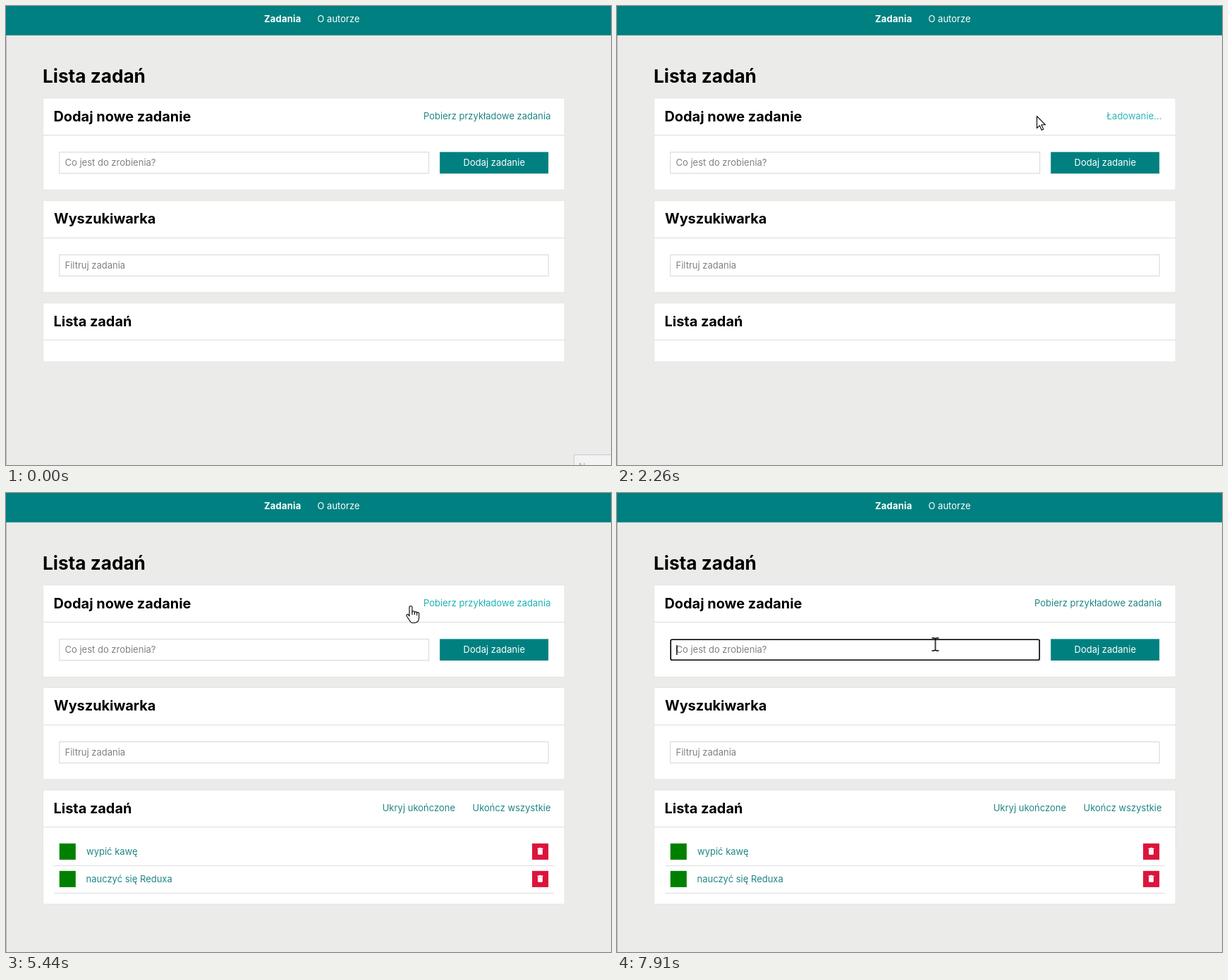
These frames come from a looping animation (858x652 px, 8000 ms). An HTML page:

```html
<!DOCTYPE html>
<html lang="pl">
<head>
<meta charset="utf-8">
<title>Lista zadań</title>
<style>
  html, body { margin: 0; width: 100%; height: 100%; overflow: hidden; background: #ebebea; }
  svg { display: block; width: 858px; height: 652px; font: 13px Inter, sans-serif; }
  line { shape-rendering: crispEdges; }

  .h1 { font-size: 26.2px; font-weight: 700; }
  .h2 { font-size: 19.9px; font-weight: 700; }
  .bold { font-weight: 700; letter-spacing: .2px; }
  .end { text-anchor: end; }
  .mid { text-anchor: middle; }
  .teal { fill: #008080; }
  .action { fill: #1f8585; }
  .white { fill: #fff; }
  .hint { fill: #808080; }
  .card { fill: #fff; stroke: #e1e1e1; stroke-width: .8; }
  .rule { stroke: #ddd; }
  .field { fill: #fff; stroke: #d6d6d6; }
  .shape { fill: #fff; stroke: #000; stroke-width: 1.1; stroke-linejoin: round; }

  .anim { animation: 8s linear infinite; }
  .switch { animation: 8s step-end infinite; }

  /* percent = milliseconds / 80 */
  .popup { animation-name: popup; }
  @keyframes popup { 0% { opacity: 1 } .875%, 100% { opacity: 0 } }

  .link { animation-name: link; }
  @keyframes link {
    0%, 22.125% { fill: #1f8585 }
    27.5% { fill: #1ab3b3 }
    34.375%, 56.875% { fill: #ccc }
    63%, 68.75% { fill: #1ab3b3 }
    75%, 100% { fill: #1f8585 }
  }
  .fetch { animation-name: fetch; }
  @keyframes fetch { 0% { opacity: 1 } 28.125% { opacity: 0 } 56.875%, 100% { opacity: 1 } }
  .loading { animation-name: loading; }
  @keyframes loading { 0% { opacity: 0 } 28.125% { opacity: 1 } 56.875%, 100% { opacity: 0 } }

  .tasks { animation-name: tasks; }
  @keyframes tasks { 0% { opacity: 0 } 56.875%, 100% { opacity: 1 } }

  .focus { animation-name: focus; }
  @keyframes focus { 0% { opacity: 0 } 84.875%, 100% { opacity: 1 } }
  .caret { animation-name: caret; }
  @keyframes caret {
    0% { opacity: 0 } 84.875% { opacity: 1 } 92.25% { opacity: 0 } 98.875%, 100% { opacity: 1 }
  }

  .cursor { animation-name: move; }
  @keyframes move {
    0%, 7.375% { transform: translate(752px, 638px); animation-timing-function: steps(6) }
    12.625% { transform: translate(575px, 340px); animation-timing-function: steps(4) }
    15.25% { transform: translate(509px, 205px); animation-timing-function: steps(2) }
    16.875% { transform: translate(545px, 180px); animation-timing-function: steps(3) }
    19.5% { transform: translate(578px, 164px); animation-timing-function: steps(4) }
    23% { transform: translate(592px, 152px); animation-timing-function: step-end }
    24.75% { transform: translate(594px, 147px); animation-timing-function: steps(2) }
    25.75% { transform: translate(596px, 142px); animation-timing-function: steps(2) }
    27.375% { transform: translate(595px, 158px); animation-timing-function: step-end }
    28.25% { transform: translate(595px, 156px); animation-timing-function: steps(7) }
    34.375% { transform: translate(584px, 158px); animation-timing-function: step-end }
    38.5% { transform: translate(582px, 158px); animation-timing-function: step-end }
    39.375% { transform: translate(581px, 158px); animation-timing-function: step-end }
    40.125%, 67.125% { transform: translate(580px, 158px); animation-timing-function: step-end }
    68% { transform: translate(574px, 160px); animation-timing-function: steps(4) }
    71.5% { transform: translate(508px, 178px); animation-timing-function: steps(5) }
    76.375% { transform: translate(451.5px, 214px); animation-timing-function: step-end }
    81.625%, 100% { transform: translate(451.5px, 215px) }
  }
  .arrow { animation-name: arrow; }
  @keyframes arrow {
    0% { opacity: 0 } 7.375% { opacity: 1 } 22.125% { opacity: 0 }
    28.125% { opacity: 1 } 56.875% { opacity: 0 } 68.875% { opacity: 1 }
    75.25%, 100% { opacity: 0 }
  }
  .hand { animation-name: hand; }
  @keyframes hand {
    0% { opacity: 0 } 22.125% { opacity: 1 } 28.125% { opacity: 0 }
    56.875% { opacity: 1 } 68.875%, 100% { opacity: 0 }
  }
  .beam { animation-name: beam; }
  @keyframes beam { 0% { opacity: 0 } 75.25%, 100% { opacity: 1 } }
</style>
</head>
<body>
<svg viewBox="0 0 858 652">
  <defs>
    <g id="task">
      <rect x="75.700" y="497.800" width="23.100" height="23.100" fill="#008000"/>
      <rect x="746.100" y="497.800" width="23.100" height="23.100" fill="#dc143c"/>
      <path class="white" d="M753.7 504.500h2.300l.6-.8h2l.6.8h2.300v1.400h-7.800z M754.200 506.300h6.800v6.200q0 1.300-1.200 1.300h-4.400q-1.200 0-1.200-1.300z"/>
      <line class="rule" x1="68" x2="777" y1="529.5" y2="529.5"/>
    </g>
  </defs>

  <rect width="858" height="652" fill="#ebebea"/>
  <line x1=".5" x2=".5" y1="41" y2="652" stroke="#b8b8b8"/>
  <rect class="teal" width="858" height="41.700"/>
  <text class="white bold" x="366" y="23">Zadania</text>
  <text class="white" x="441.500" y="23">O autorze</text>
  <text class="h1" x="52" y="109">Lista zadań</text>

  <rect class="card" x="52.600" y="130.800" width="739.600" height="130.500"/>
  <line class="rule" x1="53" x2="792" y1="183.5" y2="183.5"/>
  <text class="h2" x="67.500" y="163.500">Dodaj nowe zadanie</text>
  <g class="link anim">
    <text class="fetch switch end" x="772.500" y="161">Pobierz przykładowe zadania</text>
    <text class="loading switch end" x="772.500" y="161">Ładowanie...</text>
  </g>
  <rect class="field" x="75.700" y="207.600" width="524" height="30"/>
  <text class="hint" x="83.500" y="227">Co jest do zrobienia?</text>
  <rect class="focus switch" x="76.200" y="208.200" width="522.900" height="29" rx="2" fill="none" stroke="#000" stroke-width="1.600"/>
  <rect class="caret switch" x="84.200" y="216" width="1.400" height="14"/>
  <rect class="teal" x="615.200" y="207.400" width="154" height="30.600"/>
  <text class="white mid" x="692.300" y="227">Dodaj zadanie</text>

  <rect class="card" x="52.600" y="276.600" width="739.600" height="130.200"/>
  <line class="rule" x1="53" x2="792" y1="329.5" y2="329.5"/>
  <text class="h2" x="68" y="309">Wyszukiwarka</text>
  <rect class="field" x="75.700" y="353.500" width="693.500" height="30"/>
  <text class="hint" x="83.500" y="372.500">Filtruj zadania</text>

  <rect class="card" x="52.600" y="422" width="739.600" height="83.500"/>
  <g class="tasks switch">
    <rect class="card" x="52.600" y="422" width="739.600" height="162"/>
    <g class="action">
      <text class="end" x="637" y="452">Ukryj ukończone</text>
      <text class="end" x="772.500" y="452">Ukończ wszystkie</text>
      <text x="114" y="513.500">wypić kawę</text>
      <text x="113.500" y="552.500">nauczyć się Reduxa</text>
    </g>
    <use href="#task"/>
    <use href="#task" y="39"/>
  </g>
  <line class="rule" x1="53" x2="792" y1="474.5" y2="474.5"/>
  <text class="h2" x="67.500" y="455">Lista zadań</text>

  <g class="popup switch">
    <rect x="805.500" y="637.500" width="60" height="20" fill="#f3f3f3" stroke="#c8c8c8"/>
    <text x="812" y="659" fill="#b0b0b0">N</text>
  </g>

  <g class="cursor anim">
    <path class="arrow switch shape" d="M.5.500V17.500L4.400 13.800 7.200 20.200 9.800 19.100 7 12.800H12.600z"/>
    <g class="hand switch shape">
      <path d="M-2 15V2.500a2 2 0 0 1 4 0V9a1.800 1.800 0 0 1 3.500.6a1.800 1.800 0 0 1 3.300 1a1.600 1.600 0 0 1 2.900 1.400V17q0 7-6.500 7.500h-2q-3.500 0-5.500-4.500L-6 14.500a1.700 1.700 0 0 1 2.600-1.800z"/>
      <path fill="none" d="M2 9v4M5.500 10v3M8.800 11v3"/>
    </g>
    <path class="beam switch" fill="none" stroke="#000" stroke-width="1.500" d="M-5-9H-1.500L0-8 1.500-9H5M0-8V8M-5 9H-1.500L0 8 1.500 9H5"/>
  </g>
</svg>
</body>
</html>
```
